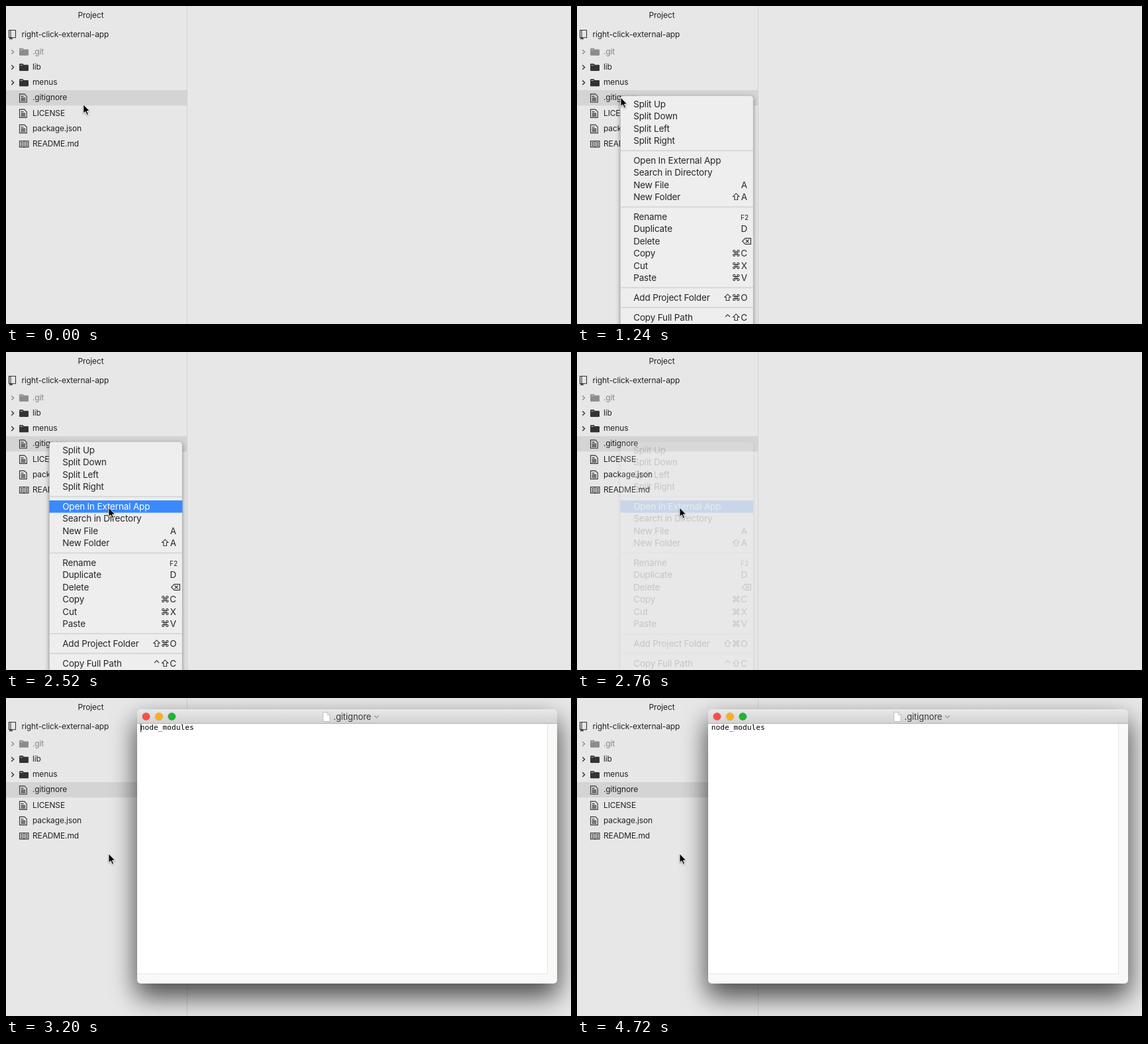
Write an HTML page that moves like this. It is 853 px wide and 480 px high and loops after 5 s.

```html
<!DOCTYPE html>
<html lang="en">
<head>
<meta charset="utf-8">
<title>Open in external app</title>
<style>
  html, body { margin: 0; width: 100%; height: 100%; overflow: hidden; background: #e7e7e7; }
  svg { display: block; width: 853px; height: 480px; }
  text { font-family: Inter, "DejaVu Sans", sans-serif; white-space: pre; }
  .side { font-size: 12px; letter-spacing: -.14px; fill: #222; }
  .item { font-size: 13.5px; letter-spacing: -.16px; fill: #262626; }
  .key { letter-spacing: 0; text-anchor: middle; }
  .on .item { fill: #fff; }
  .bar { fill: none; }
  .on .bar { fill: #3a89fd; }
  .line { fill: none; stroke: #333; stroke-width: 1.1; }
  .menu-box { fill: #eee; stroke: #0003; stroke-width: .7; filter: drop-shadow(0 3px 3.5px #0006); }
  .win-box { fill: #f9f9f8; filter: drop-shadow(0 18px 19px #0008) drop-shadow(0 0 .6px #0008); }
  .code { font: 11.2px "DejaVu Sans Mono", monospace; }
</style>
</head>
<body>
<svg viewBox="0 0 853 480">
  <defs>
    <linearGradient id="bar" x2="0" y2="1">
      <stop stop-color="#e9e9e9"/><stop offset="1" stop-color="#d1d1d1"/>
    </linearGradient>
  </defs>
  <rect width="853" height="480" fill="#e7e7e7"/>
  <rect y="127" width="273" height="23.2" fill="#d4d4d4"/>
  <rect x="273" width="1" height="480" fill="#d2d2d2"/>
  <text class="side" x="128" y="17.6" text-anchor="middle">Project</text>
  <path class="line" d="M4.5 36.5h10v11.3h-10zM7 36.5v11"/>
  <path d="M5.5 47.5h4v3.6l-2-1.5-2 1.5z" fill="#333"/>
  <text class="side" x="23.5" y="46.6">right-click-external-app</text>
  <g id="tree"></g>
  <g id="menu"><rect class="menu-box" x="65.3" y="135.3" width="201" height="400" rx="5"/></g>
  <g id="win">
    <rect class="win-box" x="198" y="17" width="634" height="414" rx="5"/>
    <path d="M198 39V22a5 5 0 0 1 5-5H827a5 5 0 0 1 5 5V39z" fill="url(#bar)"/>
    <path d="M198 38.5H832" stroke="#b4b4b4"/>
    <path d="M198 39H818V416H198z" fill="#fff"/>
    <path d="M198 416.5H817.5V39" fill="none" stroke="#e6e6e6"/>
    <g stroke="#0002" stroke-width=".7">
      <circle cx="211.5" cy="28" r="5.8" fill="#fb4e48"/>
      <circle cx="231" cy="28" r="5.8" fill="#f8b01c"/>
      <circle cx="250.3" cy="28" r="5.8" fill="#22b431"/>
    </g>
    <path d="M478.5 21.5h6.5l4 4v10h-10.5z" fill="#fff" stroke="#aaa" stroke-width=".7"/>
    <path d="M485 21.5v4h4" fill="none" stroke="#aaa" stroke-width=".7"/>
    <text x="494.3" y="32.7" font-size="13" letter-spacing="-.1" fill="#3a3a3a">.gitignore</text>
    <path d="M556 26.5l3.3 3.3 3.3-3.3" fill="none" stroke="#999" stroke-width="1.2"/>
    <text class="code" x="202.8" y="48.3">node_modules</text>
    <path id="caret" d="M203.7 39V51.5" stroke="#000"/>
  </g>
  <path id="cursor" d="M0 0V13.6L3.1 10.8 5.4 16 7.6 15 5.4 10.1H9.6z" stroke="#fff" stroke-width=".9"
    style="filter: drop-shadow(0 1px 1px #0005)"/>
</svg>
<script>
const $ = id => document.getElementById(id);
const clamp = v => Math.min(1, Math.max(0, v));
const ease = v => v * v * (3 - 2 * v);

const icons = {
  folder: '<path d="M20-4q0-1 1-1h4.5l1.3 1.8h6.2q1 0 1 1v7.3q0 1-1 1h-12q-1 0-1-1z"/><path d="M21.2-2.6h4" stroke="#e7e7e7" stroke-width=".7"/>',
  file: '<path class="line" d="M20.5-5.5h7.3l3.5 3.5v8.8h-10.8zM22.5-2h4M22.5 .5h6.8M22.5 2.5h6.8M22.5 4.5h6.8"/>',
  book: '<path class="line" d="M20.5-4.2h13.5v9h-13.5zM27.2-4v10M22-1.7h3.6M22 .4h3.6M22 2.5h3.6M29-1.7h3.6M29 .4h3.6M29 2.5h3.6"/>'
};
const entries = [['.git', 'folder'], ['lib', 'folder'], ['menus', 'folder'], ['.gitignore', 'file'],
  ['LICENSE', 'file'], ['package.json', 'file'], ['README.md', 'book']];
$('tree').innerHTML = entries.map(([name, icon], i) => `
  <g transform="translate(0 ${68.7 + 23.23 * i})" fill="#333" opacity="${i ? 1 : .5}">
    ${icon == 'folder' ? '<path d="M8.2-2.8l3.4 3.3-3.4 3.3" fill="none" stroke="#333" stroke-width="1.4"/>' : ''}
    ${icons[icon]}<text class="side" x="40" y="4.1">${name}</text>
  </g>`).join('');

const groups = [
  ['Split Up', 'Split Down', 'Split Left', 'Split Right'],
  ['Open In External App', 'Search in Directory', 'New File|A', 'New Folder|⇧A'],
  ['Rename|F2', 'Duplicate|D', 'Delete|⌫', 'Copy|⌘C', 'Cut|⌘X', 'Paste|⌘V'],
  ['Add Project Folder|⇧⌘O'],
  ['Copy Full Path|⌃⇧C']
];
const rowHeight = 18.4, groupGap = 11.4;

// Shortcut keys sit in fixed columns, filled from the right.
function shortcut(keys) {
  if (keys == 'F2') return '<text class="item key" x="253" y="13.6" style="font-size:10px">F2</text>';
  if (keys == '⌫') return '<text class="item key" x="256" y="14">⌫</text>';
  return [...keys].reverse().map((key, i) =>
    `<text class="item key" x="${[252.3, 240.3, 227.5][i]}" y="14">${key}</text>`).join('');
}

const rows = [];
let rowY = 139, menuHtml = '';
groups.forEach((group, g) => {
  if (g) {
    menuHtml += `<rect x="65.6" y="${rowY + 4.9}" width="200.4" height="1.8" fill="#d6d6d6"/>`;
    rowY += groupGap;
  }
  for (const item of group) {
    const [label, keys = ''] = item.split('|');
    menuHtml += `<g class="row" transform="translate(0 ${rowY})">
      <rect class="bar" x="65.3" width="201" height="18.6"/>
      <text class="item" x="85.2" y="14">${label}</text>${shortcut(keys)}</g>`;
    rows.push({ y: rowY });
    rowY += rowHeight;
  }
});
$('menu').insertAdjacentHTML('beforeend', menuHtml);
document.querySelectorAll('.row').forEach((el, i) => rows[i].el = el);

// Pointer moves: start, end, target x, target y.
const moves = [[0, 440, 66, 138], [1360, 1760, 157, 230], [1840, 2080, 155, 235]];
function pointer(t) {
  let x = 116.8, y = 148.5;
  for (const [start, end, toX, toY] of moves) {
    const k = ease(clamp((t - start) / (end - start)));
    x += (toX - x) * k;
    y += (toY - y) * k;
  }
  return [x, y];
}

function draw(t) {
  const [x, y] = pointer(t);
  $('cursor').setAttribute('transform', `translate(${x} ${y})`);

  $('menu').style.opacity = t < 840 ? 0 : 1 - clamp((t - 2560) / 240);
  const blink = t >= 2440 && t < 2520;
  for (const row of rows)
    row.el.classList.toggle('on', !blink && y >= row.y && y < row.y + rowHeight);

  const scale = clamp((t - 3000) / 177);
  $('win').style.opacity = scale;
  $('win').setAttribute('transform', `translate(515 224) scale(${scale}) translate(-515 -224)`);

  const phase = (t - 3000) % 1120;
  $('caret').style.opacity = t < 3200 ? 1 : Math.min(clamp((phase + 40) / 80), 1 - clamp((phase - 520) / 80));
}

function tick() {
  draw(Math.floor(performance.now() % 5000 / 40) * 40);
  requestAnimationFrame(tick);
}
tick();
</script>
</body>
</html>
```
